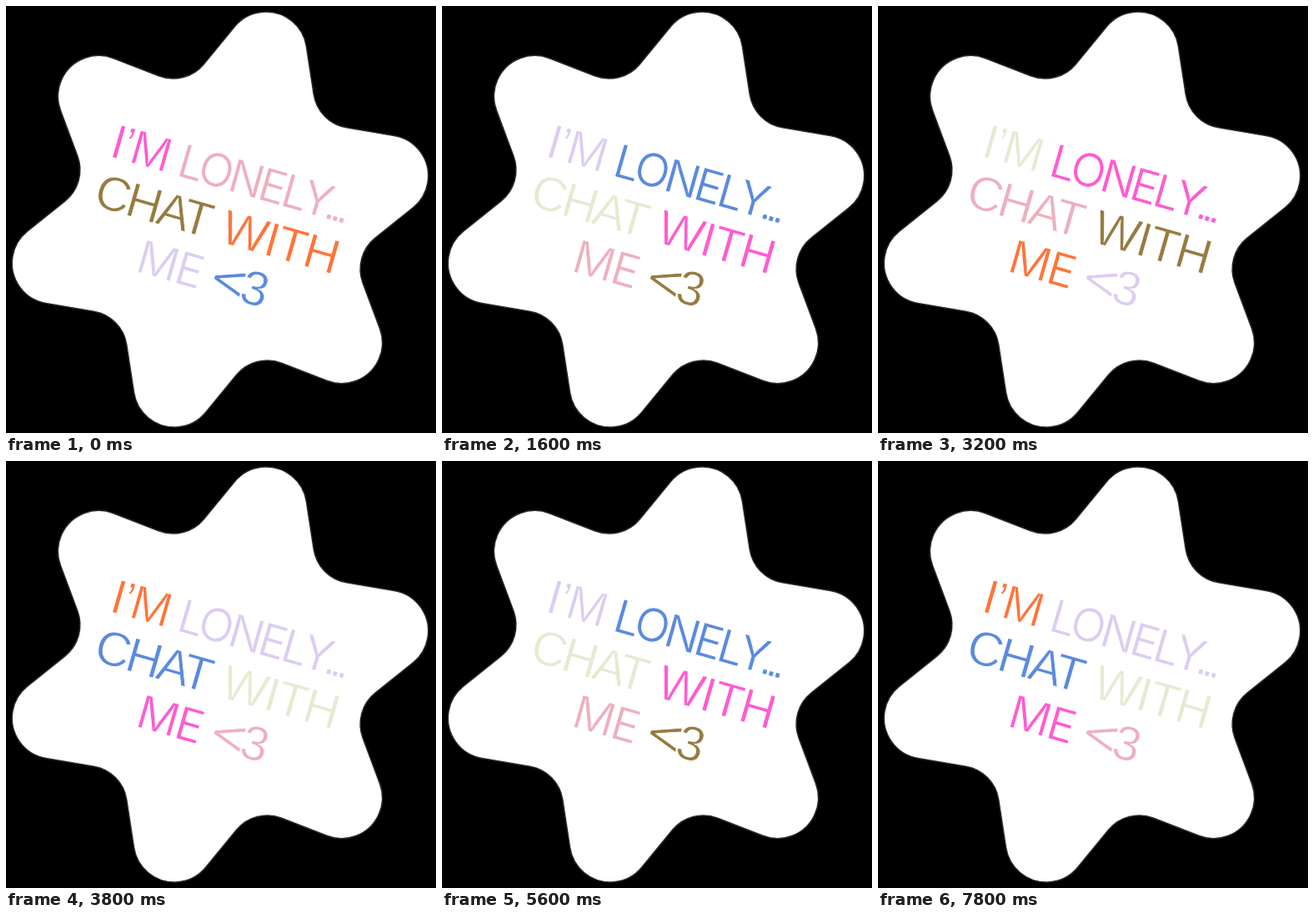
An HTML page with a canvas that plays this animation: 516x512 px, repeating every 8 s.

```html
<!DOCTYPE html>
<html lang="en">
<head>
<meta charset="utf-8">
<title>Lonely star</title>
<style>
  html, body { margin: 0; width: 100%; height: 100%; overflow: hidden; background: #000; }
  canvas { display: block; }
</style>
</head>
<body>
<canvas id="stage" width="516" height="512"></canvas>
<script>
const ctx = document.getElementById('stage').getContext('2d');
const RAD = Math.PI / 180;
const CENTER = { x: 257, y: 256 };
const STEP = 200, STEPS = 5;

const COLORS = ['#ff5bd2', '#edb0c0', '#967c41', '#ff7439', '#dccdf1', '#5b8adf', '#e7ead1'];

const GROTESK = '58.5px "Liberation Sans", Arial, sans-serif';
const NARROW = '400 55.3px Inter, sans-serif';
const SIGN = '57px "DejaVu Sans", sans-serif';

// Each run: text, font, left edge, baseline, tracking, colour slot
const RUNS = [
  ['I’M', GROTESK, -150.6, -36, -2.4, 0],
  ['LONELY', NARROW, -66.8, -36, -4.4, 1],
  ['...', GROTESK, 116.3, -36, -8.3, 1],
  ['CHAT', GROTESK, -152.4, 26, -3.6, 2],
  ['WITH', GROTESK, 5.4, 26, -1.7, 3],
  ['ME', NARROW, -82.5, 88, -2.4, 4],
  ['<', SIGN, 6.2, 86, 0, 5],
  ['3', GROTESK, 46.9, 88, 0, 5]
];

function polar(r, deg) {
  return { x: CENTER.x + r * Math.cos(deg * RAD), y: CENTER.y + r * Math.sin(deg * RAD) };
}

function angle(from, to) {
  return Math.atan2(to.y - from.y, to.x - from.x);
}

// Six lobes and six notches, joined by their common tangents
function starPath() {
  const lobeDist = 207.5, notchDist = 224, lobeR = 48.9, notchR = 47.8;
  const path = new Path2D();
  for (let i = 0; i < 6; i++) {
    const a = -74.6 + i * 60;
    const lobe = polar(lobeDist, a), after = polar(lobeDist, a + 60);
    const notch = polar(notchDist, a + 30), before = polar(notchDist, a - 30);
    const gap = Math.hypot(notch.x - lobe.x, notch.y - lobe.y);
    const lean = Math.acos((lobeR + notchR) / gap);
    path.arc(lobe.x, lobe.y, lobeR, angle(lobe, before) + lean, angle(lobe, notch) - lean);
    path.arc(notch.x, notch.y, notchR, angle(notch, lobe) - lean, angle(notch, after) + lean, true);
  }
  path.closePath();
  return path;
}

const star = starPath();

function draw(time) {
  const step = Math.floor(time / STEP) % STEPS;
  ctx.fillStyle = '#000';
  ctx.fillRect(0, 0, 516, 512);
  ctx.fillStyle = '#fff';
  ctx.fill(star);
  ctx.strokeStyle = '#2b2b2b';
  ctx.lineWidth = 1.5;
  ctx.stroke(star);

  ctx.save();
  ctx.translate(CENTER.x, CENTER.y);
  ctx.rotate(16 * RAD);
  ctx.textBaseline = 'alphabetic';
  // A thin white outline lightens the letters
  ctx.strokeStyle = '#fff';
  ctx.lineWidth = 0.9;
  for (const [text, font, x, y, tracking, slot] of RUNS) {
    ctx.font = font;
    ctx.letterSpacing = tracking + 'px';
    ctx.fillStyle = COLORS[(slot + 7 - step) % 7];
    ctx.fillText(text, x, y);
    ctx.strokeText(text, x, y);
  }
  ctx.restore();
}

const start = performance.now();
function tick() {
  draw((performance.now() - start) % 8000);
  requestAnimationFrame(tick);
}
tick();
</script>
</body>
</html>
```
